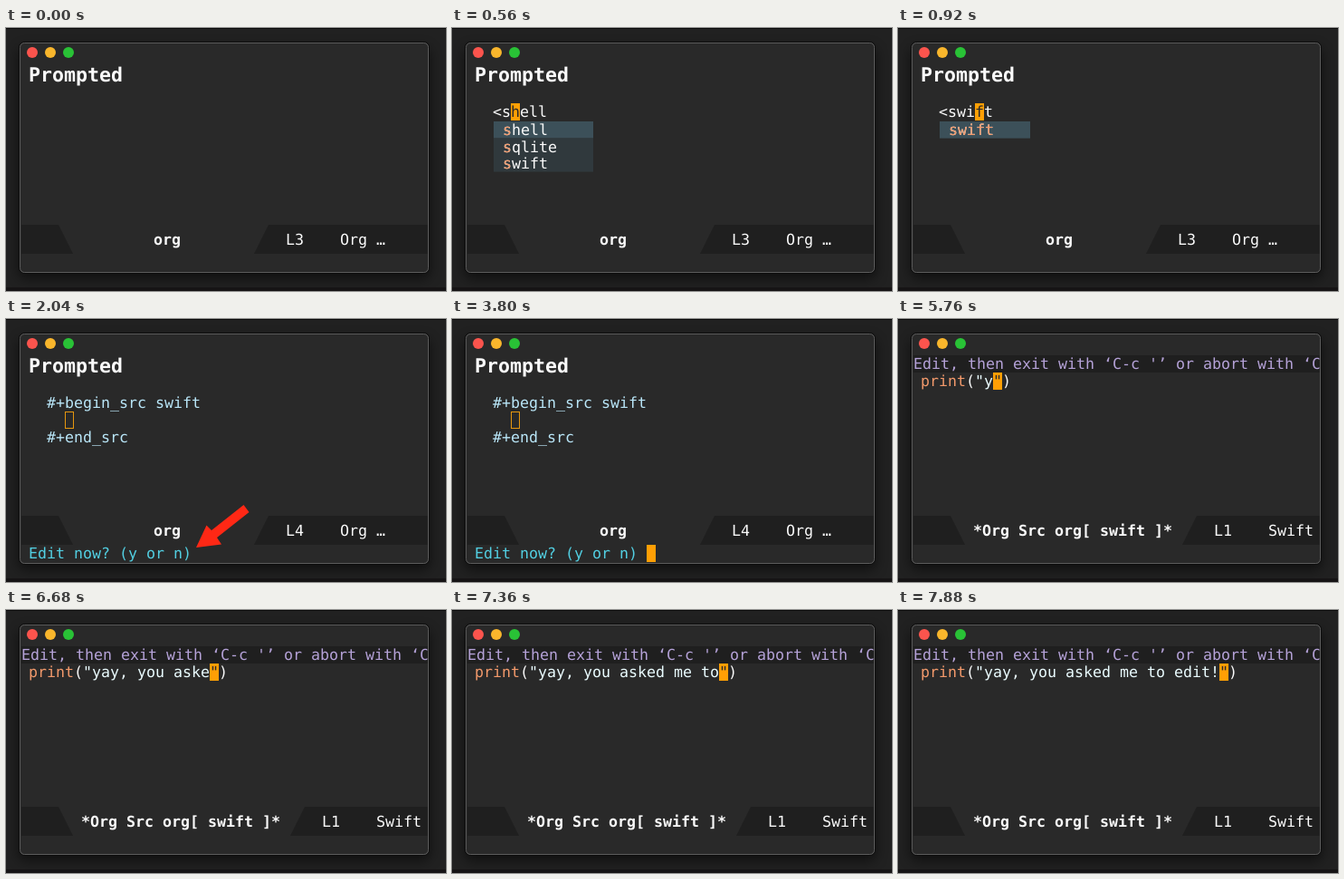
An HTML page for the animation above (8 s loop, 486 px wide and 290 px high).

```html
<!DOCTYPE html>
<html lang="en">
<head>
<meta charset="utf-8">
<title>Editor prompt</title>
<style>
  html, body { margin: 0; width: 100%; height: 100%; overflow: hidden; background: #202020; }
  svg { display: block; width: 486px; height: 290px; }
  text { font: 16.61px "DejaVu Sans Mono", monospace; white-space: pre; text-rendering: geometricPrecision; }
  .bold { font-weight: bold; }
  .title { font-size: 21.6px; font-weight: bold; }
</style>
</head>
<body>
<svg viewBox="0 0 486 290">
  <defs>
    <filter id="blur" x="-20%" y="-20%" width="140%" height="140%"><feGaussianBlur stdDeviation="7"/></filter>
    <clipPath id="inside"><rect x="17" y="18" width="448.5" height="251"/></clipPath>
  </defs>
  <rect width="486" height="290" fill="#212121"/>
  <rect x="14" y="22" width="454" height="254" rx="7" fill="#000" opacity=".55" filter="url(#blur)"/>
  <rect width="486" height="1" fill="#0b0b0b"/>
  <rect y="286" width="486" height="4" fill="#161415"/>
  <rect x="14.5" y="15.5" width="453" height="255" rx="5.5" fill="#292929" stroke="#0d0d0d"/>
  <rect x="15.5" y="16.5" width="451" height="253" rx="5" fill="#292929" stroke="#5c5c5c"/>
  <circle cx="29" cy="27" r="6" fill="#fb544d"/>
  <circle cx="49" cy="27" r="6" fill="#f9b62c"/>
  <circle cx="69" cy="27" r="6" fill="#29c236"/>
  <g id="screen" clip-path="url(#inside)"></g>
</svg>
<script>
const LOOP = 8000, CELL = 10, ROW = 19;
const WHITE = '#fafafa', DARK = '#292929', BAR = '#1f1f1f', ORANGE = '#ff9f05';
const BLOCK = '#b9e6f8', CYAN = '#52cfe2', KEYWORD = '#f2996b', STRING = '#eafcff';
const MESSAGE = 'yay, you asked me to edit!';
const LANGS = ['emacs-lisp', 'python', 'shell', 'sqlite', 'swift'];
const screen = document.getElementById('screen');

const esc = s => s.replace(/&/g, '&amp;').replace(/</g, '&lt;');
const text = (x, y, s, fill = WHITE, cls = '') =>
  `<text x="${x}" y="${y}" fill="${fill}" class="${cls}">${esc(s)}</text>`;
const rect = (x, y, w, h, fill) =>
  `<rect x="${x}" y="${y}" width="${w}" height="${h}" fill="${fill}"/>`;

// Block cursor in the row starting at y, with the covered glyph in dark.
const cursor = (x, y, glyph = '') =>
  rect(x, y, CELL, ROW, ORANGE) + (glyph ? text(x, y + 15, glyph, DARK) : '');

function modeLine(name, nameX, edge, line, mode) {
  return rect(17, 217, 449, 32, BAR) +
    `<path d="M58 217H${edge}L${edge - 16} 249H74Z" fill="${DARK}"/>` +
    text(nameX, 239, name, WHITE, 'bold') +
    text(edge + 19, 239, line) + text(edge + 79, 239, mode);
}

function popup(items, typed, width) {
  return items.map((item, i) => {
    const y = 103 + i * 18.5;
    return rect(46, y, width, 18.6, i ? '#30393d' : '#3c5059') +
      text(56, y + 15, item, WHITE) +
      text(56, y + 15, i || typed < 3 ? item.slice(0, typed) : item, KEYWORD);
  }).join('');
}

function completion(t) {
  if (t < 240) return t < 40 ? '' : cursor(25, 83);
  if (t >= 1080) return text(45, 98, '<swift') + cursor(105, 83);
  const typed = t < 440 ? 0 : t < 600 ? 1 : t < 760 ? 2 : 3;
  const prefix = 'swi'.slice(0, typed);
  const items = LANGS.filter(s => s.startsWith(prefix));
  const x = 55 + typed * CELL;
  return text(45, 98, '<' + prefix + items[0].slice(typed)) +
    cursor(x, 83, items[0][typed]) +
    popup(items, typed, typed > 1 ? 100 : typed ? 110 : 180);
}

function prompt(t) {
  const lit = t < 1560 || Math.floor((t - 1560) / 240) % 2 === 1;
  const arrow = t >= 1560 && t < 3560;
  return text(45, 98, '#+begin_src swift', BLOCK) + text(45, 136, '#+end_src', BLOCK) +
    '<rect x="65.5" y="102.5" width="9" height="18" fill="none" stroke="#e5960f"/>' +
    text(25, 264, 'Edit now? (y or n)', CYAN) +
    (lit ? cursor(215, 249) : '') +
    (arrow ? '<path d="M210 252L221.5 227.5L227 233L262.5 205L268.5 213L233 241L238 248.5Z" fill="#ff2815"/>' : '');
}

function orgBuffer(t) {
  const asking = t >= 1160;
  return modeLine('org', 163, 290, asking ? 'L4' : 'L3', 'Org …') +
    text(25, 59, 'Prompted', WHITE, 'title') +
    (asking ? prompt(t) : completion(t));
}

function messageLength(t) {
  if (t < 5760) return 0;
  if (t < 6760) return Math.min(13, 1 + Math.floor((t - 5760) / 76.6));
  if (t < 6880) return t < 6800 ? 14 : 15;
  return Math.min(MESSAGE.length, 16 + Math.floor((t - 6880) / 100));
}

function code(t) {
  if (t < 4720) {
    const n = [4360, 4480, 4560, 4600].filter(at => t >= at).length;
    const lit = t < 4120 || t >= 4360;
    return text(25, 74, 'print'.slice(0, n)) + (lit ? cursor(25 + n * CELL, 59) : '');
  }
  const word = text(25, 74, 'print', t < 4800 ? WHITE : KEYWORD);
  if (t < 4960) return word + cursor(75, 59);
  if (t < 5320) return word + text(75, 74, '(') + cursor(85, 59, ')');
  const n = messageLength(t), x = 95 + n * CELL;
  const lit = t < 5560 || t >= 5760;
  return word + text(75, 74, '(') + text(85, 74, '"' + MESSAGE.slice(0, n), STRING) +
    (lit ? cursor(x, 59, '"') : text(x, 74, '"', STRING)) + text(x + CELL, 74, ')');
}

function editBuffer(t) {
  return modeLine('*Org Src org[ swift ]*', 83, 330, 'L1', 'Swift') +
    rect(17, 40, 449, ROW, BAR) +
    text(17, 55, 'Edit, then exit with ‘C-c \'’ or abort with ‘C', '#b5a2d8') +
    code(t);
}

let shown = '';
function draw(t) {
  const next = t < 3880 ? orgBuffer(t) : editBuffer(t);
  if (next !== shown) screen.innerHTML = shown = next;
}

const start = performance.now();
function tick() {
  draw((performance.now() - start) % LOOP);
  requestAnimationFrame(tick);
}
tick();
</script>
</body>
</html>
```
